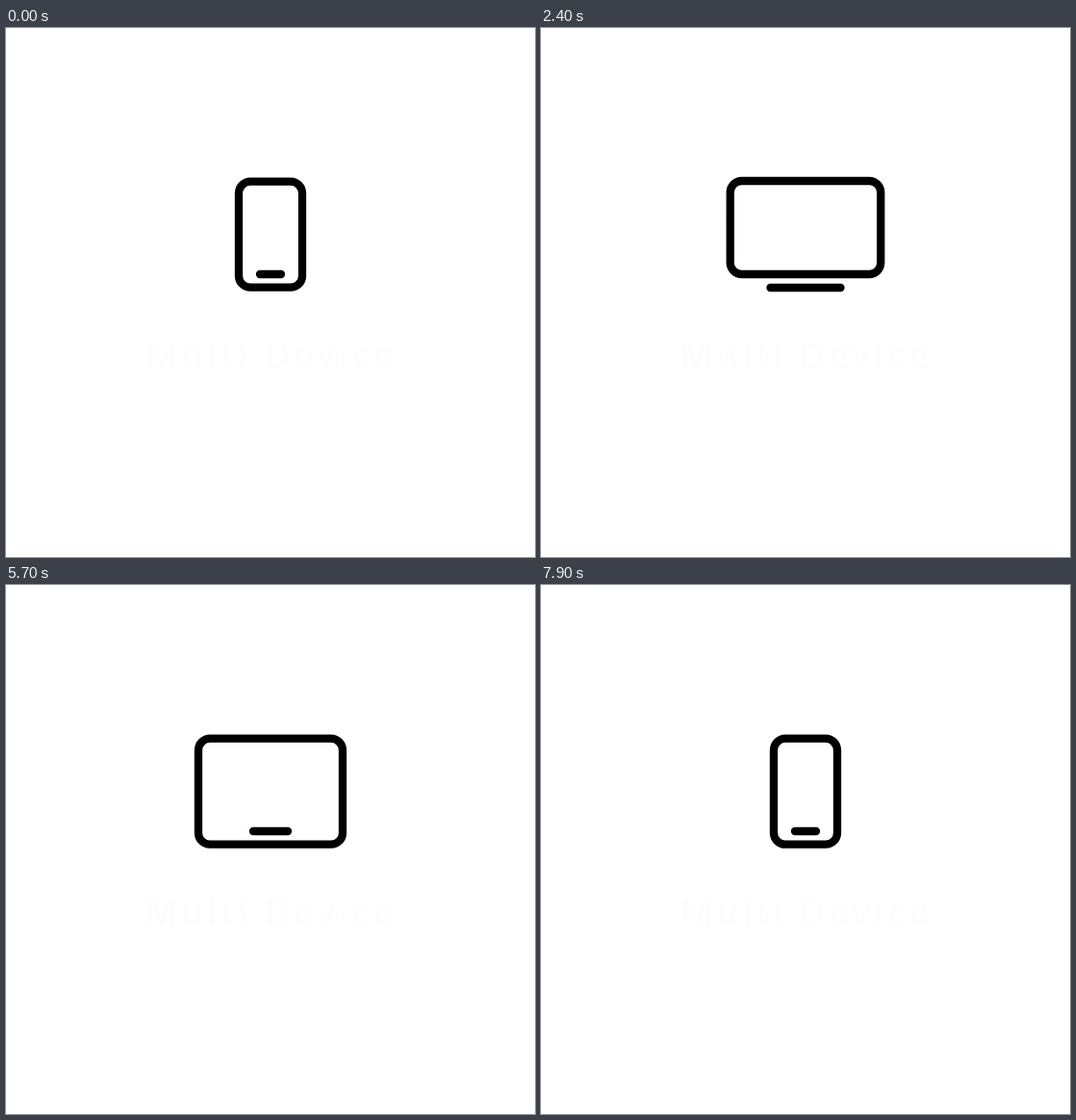
Write an HTML page with a canvas that moves like this. It is 550 px wide and 550 px high and loops after 8.43 s.

```html
<!DOCTYPE html>
<html lang="en">
<head>
<meta charset="utf-8">
<title>Multi Device</title>
<style>
  html, body { margin: 0; width: 100%; height: 100%; overflow: hidden; background: #fff; }
  canvas { display: block; width: 550px; height: 550px; }
</style>
</head>
<body>
<canvas id="stage" width="550" height="550"></canvas>
<script>
const ctx = document.getElementById('stage').getContext('2d');
const LOOP = 8430, TICK = 1000 / 30, CYCLE = 127 * TICK;
const CX = 275, STROKE = 8.3, RADIUS = 12;

// Outline size and centre, then length and height of the bar
const phone = { w: 66, h: 110, y: 214.7, bar: 22, barY: 256 };
const tablet = { w: 150, h: 110, y: 214.7, bar: 36, barY: 256 };
const monitor = { w: 156.5, h: 97, y: 207.5, bar: 73, barY: 270 };

const steps = [
  { at: 417, from: phone, to: tablet, turn: 0 },
  { at: 1583, from: tablet, to: monitor, turn: 90 },
  { at: 2783, from: monitor, to: phone, turn: 90 }
];

// Damped spring, time in seconds
function spring(t) {
  return t <= 0 ? 0 : 1 - Math.exp(-9.9 * t) * Math.cos(13.1 * t);
}

function pose(time) {
  const local = time % CYCLE;
  const step = steps.filter(s => s.at <= local).pop() || steps[0];
  const { from, to, turn } = step;
  const p = spring((local - step.at) / 1000);
  const mix = (a, b) => a + (b - a) * p;
  // A quarter turn swaps the sides of the end shape
  return {
    w: mix(from.w, turn ? to.h : to.w),
    h: mix(from.h, turn ? to.w : to.h),
    y: mix(from.y, to.y),
    bar: mix(from.bar, to.bar),
    barY: mix(from.barY, to.barY),
    angle: turn * p * Math.PI / 180
  };
}

function drawLabel() {
  ctx.font = '600 36px "Open Sans", "Noto Sans", sans-serif';
  ctx.letterSpacing = '4px';
  ctx.fillStyle = '#fdfdfd';
  ctx.fillText('Multi Device', 145, 353);
}

function drawDevice(d) {
  ctx.strokeStyle = '#000';
  ctx.lineWidth = STROKE;
  ctx.lineCap = 'round';

  ctx.save();
  ctx.translate(CX, d.y);
  ctx.rotate(d.angle);
  ctx.beginPath();
  ctx.roundRect(-d.w / 2, -d.h / 2, d.w, d.h, RADIUS);
  ctx.stroke();
  ctx.restore();

  ctx.beginPath();
  ctx.moveTo(CX - d.bar / 2, d.barY);
  ctx.lineTo(CX + d.bar / 2, d.barY);
  ctx.stroke();
}

function render() {
  const time = performance.now() % LOOP;
  const tick = Math.floor((time + 3.5) / TICK);
  ctx.fillStyle = '#fff';
  ctx.fillRect(0, 0, 550, 550);
  drawLabel();
  drawDevice(pose(tick * TICK));
  requestAnimationFrame(render);
}
render();
</script>
</body>
</html>
```
